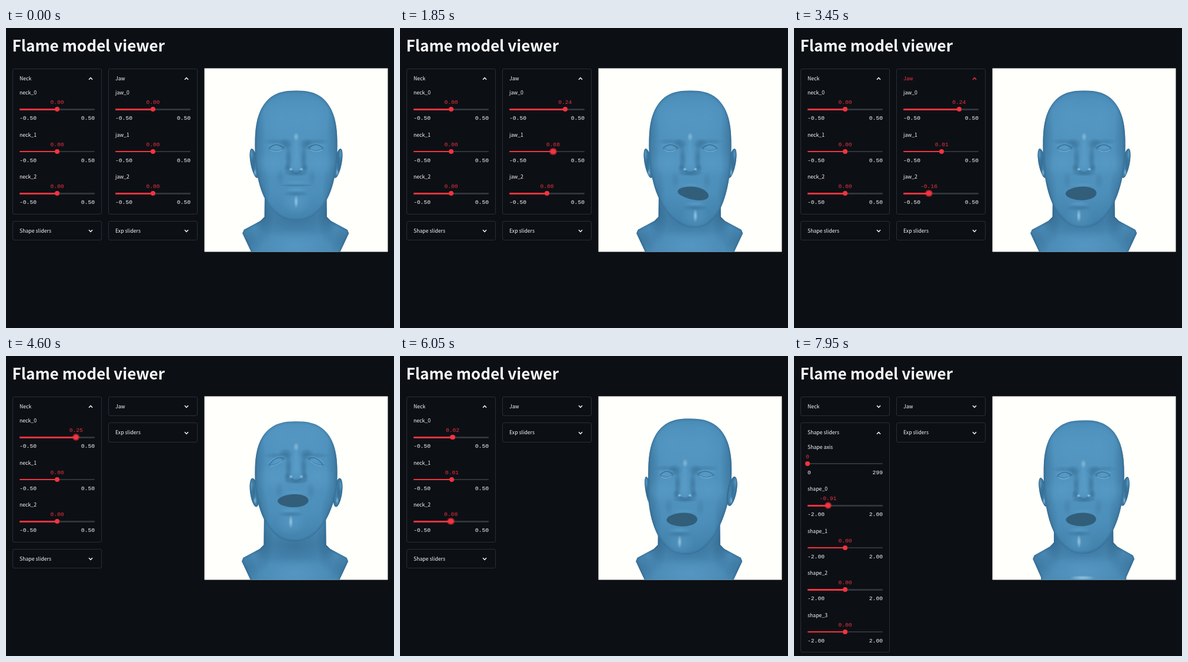
An HTML page with a canvas for the animation above (8000 ms loop, 660x510 px).

```html
<!DOCTYPE html>
<html lang="en">
<head>
<meta charset="utf-8">
<title>Flame model viewer</title>
<style>
  html, body { margin: 0; width: 100%; height: 100%; overflow: hidden; background: #0c1015; }
  body { position: relative; color: #fafafa; font: 8.7px/12px "Noto Sans CJK JP", "Noto Sans CJK SC", "Noto Sans", sans-serif; }
  h1 { position: absolute; left: 10.5px; top: 9px; margin: 0; font-size: 26.1px; line-height: 40px; font-weight: 700; white-space: nowrap; }
  canvas { position: absolute; left: 337px; top: 68px; width: 314px; height: 314px; }
  .col { position: absolute; top: 68.5px; width: 152px; }
  .panel { position: relative; box-sizing: border-box; border: 1px solid #2a2e36; border-radius: 3px; margin-bottom: 11px; }
  .head { height: 31.5px; line-height: 31px; padding-left: 11px; }
  .head svg { position: absolute; right: 14px; top: 12.5px; width: 8px; height: 8px; fill: none; stroke: currentColor; stroke-width: 1.5; }
  .open .head svg { transform: scaleY(-1); }
  .body { display: none; }
  .open .body { display: block; }
  .hot { color: #f5333f; }
  .slider { position: relative; height: 71.5px; margin: 0 11px; }
  .slider > * { position: absolute; }
  .name { top: 3.2px; left: 0; }
  .num { font: 9.67px/12px "Liberation Mono", monospace; white-space: nowrap; }
  .val { top: 20px; color: #ee3040; transform: translateX(-50%); }
  .min { top: 47.3px; left: 0; }
  .max { top: 47.3px; right: 0; }
  .rail, .fill { top: 36px; left: 0; height: 2.6px; border-radius: 1.3px; }
  .rail { width: 100%; background: #30343b; }
  .fill { background: #f5333f; }
  .knob { top: 33.1px; width: 8.4px; height: 8.4px; margin-left: -4.2px; border-radius: 50%; background: #f5333f; }
  .focus .knob { box-shadow: 0 0 0 2px rgba(245, 51, 63, .55); }
</style>
</head>
<body>
<h1>Flame model viewer</h1>
<div class="col" id="left" style="left:11px"></div>
<div class="col" id="right" style="left:174px"></div>
<canvas></canvas>
<script>
const LOOP = 8000, LAG = 150, CX = 493.5, CY = 240;

// Each drag swings in half waves around an eased move to its end value
const DRAGS = {
  jaw_0: { from: 550, to: 1250, end: .24, amp: .12, waves: 1 },
  jaw_1: { from: 1400, to: 2450, end: .01, amp: .18, waves: 2 },
  jaw_2: { from: 2600, to: 3250, end: -.16, amp: .2, waves: 1 },
  neck_0: { from: 3900, to: 4750, end: .02, amp: -.262, waves: 2 },
  neck_1: { from: 4950, to: 5950, end: .01, amp: -.38, waves: 2 },
  neck_2: { from: 6050, to: 6750, end: .01, amp: -.33, waves: 2 },
  shape_0: { from: 7550, to: 7950, end: -.91, amp: 0, waves: 0 }
};
const JAW_CLOSES = 3550, NECK_CLOSES = 7000, SHAPE_OPENS = 7150;

const clamp = (v, a, b) => Math.min(b, Math.max(a, v));
const mix = (a, b, p) => a + (b - a) * p;
const ease = p => { p = clamp(p, 0, 1); return p * p * (3 - 2 * p); };
const between = (t, a, b) => t >= a && t < b;

function valueAt(name, t) {
  const d = DRAGS[name];
  if (!d) return 0;
  const p = clamp((t - d.from) / (d.to - d.from), 0, 1);
  return d.end * ease(p) + d.amp * Math.sin(Math.PI * d.waves * p);
}

function focusAt(t) {
  const begun = Object.keys(DRAGS).filter(name => t >= DRAGS[name].from).pop();
  const closed = { jaw_2: JAW_CLOSES, neck_2: NECK_CLOSES }[begun];
  return closed && t >= closed ? '' : begun;
}

// ---- Controls ----
const sliders = [];

function add(parent, cls, text = '') {
  const el = document.createElement('div');
  el.className = cls;
  el.textContent = text;
  parent.append(el);
  return el;
}

function addSlider(body, name, min, max, digits = 2) {
  const root = add(body, 'slider');
  add(root, 'name', name);
  add(root, 'rail');
  const fill = add(root, 'fill'), knob = add(root, 'knob'), val = add(root, 'num val');
  add(root, 'num min', min.toFixed(digits));
  add(root, 'num max', max.toFixed(digits));
  sliders.push({ name, min, max, digits, root, fill, knob, val });
}

function addPanel(col, title, fill) {
  const root = add(document.getElementById(col), 'panel');
  const head = add(root, 'head', title);
  head.insertAdjacentHTML('beforeend', '<svg viewBox="0 0 8 8"><path d="M1 2.2 4 5.4 7 2.2"/></svg>');
  const body = add(root, 'body');
  if (fill) fill(body);
  return { root, head };
}

const series = (part, count, limit) => body => {
  for (let i = 0; i < count; i++) addSlider(body, part + '_' + i, -limit, limit);
};
const neck = addPanel('left', 'Neck', series('neck', 3, .5));
const shape = addPanel('left', 'Shape sliders', body => {
  addSlider(body, 'Shape axis', 0, 299, 0);
  series('shape', 4, 2)(body);
});
const jaw = addPanel('right', 'Jaw', series('jaw', 3, .5));
addPanel('right', 'Exp sliders');

function setPanel(panel, open, hot) {
  panel.root.classList.toggle('open', open);
  panel.head.classList.toggle('hot', hot);
}

function drawControls(t) {
  setPanel(neck, t < NECK_CLOSES, between(t, NECK_CLOSES - 100, NECK_CLOSES + 50));
  setPanel(jaw, t < JAW_CLOSES, between(t, JAW_CLOSES - 150, JAW_CLOSES + 100));
  setPanel(shape, t >= SHAPE_OPENS, between(t, SHAPE_OPENS - 50, SHAPE_OPENS + 200));
  const focus = focusAt(t);
  for (const s of sliders) {
    const v = valueAt(s.name, t);
    const pos = (v - s.min) / (s.max - s.min) * 100 + '%';
    s.fill.style.width = s.knob.style.left = s.val.style.left = pos;
    s.val.textContent = v.toFixed(s.digits).replace(/^-(0\.00)$/, '$1');
    s.root.classList.toggle('focus', s.name === focus);
  }
}

// ---- Head ----
const canvas = document.querySelector('canvas'), ctx = canvas.getContext('2d');
const dpr = window.devicePixelRatio || 1;
canvas.width = canvas.height = 314 * dpr;

const DARK = '38,85,120', LIGHT = '100,168,211', SHINE = '190,226,246';

// Depth of the face surface
const faceZ = (x, y) => 118 - x * x / 45 - Math.max(0, 190 - y) * .8;

// Points of a closed curve, from a function of the angle
function ring(count, at) {
  return Array.from({ length: count }, (_, i) => at(i / count * 2 * Math.PI));
}

function trace(pts) {
  ctx.beginPath();
  pts.forEach(p => ctx.lineTo(...p));
  ctx.closePath();
}

function softSpot(x, y, rx, ry, rgb, alpha, turn = 0) {
  const g = ctx.createRadialGradient(0, 0, 0, 0, 0, 1);
  g.addColorStop(0, `rgba(${rgb},${alpha})`);
  g.addColorStop(.45, `rgba(${rgb},${alpha * .62})`);
  g.addColorStop(1, `rgba(${rgb},0)`);
  ctx.save();
  ctx.translate(x, y);
  ctx.rotate(turn);
  ctx.scale(rx * 1.3, ry * 1.3);
  ctx.fillStyle = g;
  ctx.fillRect(-1, -1, 2, 2);
  ctx.restore();
}

function rim(alpha) {
  for (const w of [1.2, 4, 8]) {
    ctx.lineWidth = w;
    ctx.strokeStyle = `rgba(${DARK},${alpha / Math.sqrt(w)})`;
    ctx.stroke();
  }
}

function drawBody({ yaw, pitch, roll, slim }) {
  const dx = roll * 14 - Math.abs(yaw) * 12 - Math.abs(pitch) * 4 - .8;
  const p = (x, y) => [CX + x * (1 - .045 * slim) + dx, y - 4 * slim];
  const half = [[76, 390], [76, 380], [90.5, 349], [88, 343], [60, 328], [53, 321], [52.5, 262]];
  trace([...half.map(([x, y]) => p(x, y)), ...half.reverse().map(([x, y]) => p(-x, y))]);
  ctx.fillStyle = '#4a8bb6';
  ctx.fill();
  ctx.save();
  ctx.clip();
  softSpot(...p(0, 322), 64, 28, DARK, .4);
  for (const s of [-1, 1]) {
    softSpot(...p(54 * s, 310), 14, 45, DARK, .4);
    softSpot(...p(85 * s, 362), 24, 22, DARK, .35);
  }
  softSpot(...p(0, 370), 50, 22, LIGHT, .4);
  softSpot(...p(-2, 381), 17, 3, SHINE, .6 * slim);
  rim(.3);
  ctx.restore();
}

function poseAt(t) {
  const v = name => valueAt(name, t);
  return {
    open: v('jaw_0'), swing: v('jaw_1'), tilt: v('jaw_2'),
    pitch: v('neck_0') * 1.3, yaw: -v('neck_1') * .6, roll: v('neck_2'),
    slim: -v('shape_0') / .62
  };
}

// x counts from the middle of the face; w is how far a point follows the jaw
function projector({ open, swing, tilt, pitch, yaw, roll, slim }) {
  const [cy, sy, cp, sp, cr, sr] = [yaw, pitch, roll].flatMap(a => [Math.cos(a), Math.sin(a)]);
  return (x, y, z, w = 0) => {
    y += w * (100 * open + x * (.75 * swing - .5 * tilt));
    x += w * (50 * swing + 60 * tilt);
    x *= 1 - .022 * slim;
    y = (y - CY) * (1 - .018 * slim) + .5 * slim;
    const x1 = x * cy + z * sy, z1 = z * cy - x * sy, y1 = y * cp - z1 * sp;
    return [CX + x1 * cr + y1 * sr + roll * 10, CY - x1 * sr + y1 * cr];
  };
}

// Skull and jaw: two superelliptic halves that meet at eye level
function outline(project, yaw) {
  const arc = (v, n) => Math.sign(v) * Math.abs(v) ** (2 / n);
  return ring(96, a => {
    const low = Math.sin(a) > 0, n = low ? 2.25 : 2.6;
    const q = arc(Math.sin(a), n), x = 70 * arc(Math.cos(a), n), y = 200 + q * (low ? 127 : 93.5);
    const facing = 26 + 44 * ease((y - 190) / 90), away = -20 + 90 * ease((y - 190) / 150);
    const z = mix(away, facing, .5 + .5 * Math.tanh(x * yaw * .15));
    return project(x, y, z, low ? .5 * q * q : 0);
  });
}

function drawEar(side, project) {
  trace(ring(28, a => {
    const c = Math.cos(a), s = Math.sin(a);
    return project(side * (71 + 6.5 * c - 4.5 * s), 230 + 25 * s, -6 - 16 * c);
  }));
  ctx.fillStyle = '#4484ae';
  ctx.fill();
  ctx.save();
  ctx.clip();
  rim(.5);
  softSpot(...project(72 * side, 228, -8), 3, 15, DARK, .5);
  softSpot(...project(76 * side, 214, -18), 2, 8, LIGHT, .6);
  softSpot(...project(70 * side, 246, 0), 2, 5, SHINE, .5);
  ctx.restore();
}

function drawEye(side, project) {
  const lid = (from, to, y, bulge, rgb, alpha) => {
    const q = (x, yy) => project(x * side, yy, faceZ(x, yy));
    ctx.beginPath();
    ctx.moveTo(...q(from, y));
    ctx.quadraticCurveTo(...q((from + to) / 2, y + bulge), ...q(to, y));
    ctx.strokeStyle = `rgba(${rgb},${alpha})`;
    ctx.lineWidth = 1.2;
    ctx.stroke();
  };
  lid(20, 48, 200, -7, LIGHT, .5);
  lid(21, 46, 204.5, -12, DARK, .6);
  lid(21, 46, 204.5, 8, DARK, .35);
  lid(24, 44, 207, 6, SHINE, .35);
}

function drawMouth(project, open) {
  const gap = ease(open * 12);
  trace(ring(40, a => {
    const x = 26 * Math.cos(a), s = Math.sin(a);
    return project(x, 267.5 + s, 116, .58 + (s > 0 ? .42 : .45) * s);
  }));
  ctx.fillStyle = `rgba(50,94,122,${mix(.4, 1, gap)})`;
  ctx.fill();
}

function drawFace(project, { yaw, roll, open }) {
  const spot = (x, y, rx, ry, rgb, alpha, w = 0, lift = 0) =>
    softSpot(...project(x, y, faceZ(x, y) + lift, w), rx * Math.cos(yaw), ry, rgb, alpha, -roll);
  const pair = (x, ...rest) => [-1, 1].forEach(s => spot(x * s, ...rest));

  // Planes of the skull and cheeks
  pair(72, 190, 16, 75, DARK, .4);
  pair(62, 275, 14, 38, DARK, .35, .2);
  pair(26, 150, 32, 34, LIGHT, .25);
  pair(38, 230, 22, 18, LIGHT, .3);
  pair(27, 254, 6, 12, DARK, .16, .2);

  // Brow and eyes
  pair(18, 197, 10, 8, DARK, .42);
  pair(35, 193, 17, 4, DARK, .22);
  pair(34, 203, 11, 5, LIGHT, .35);
  spot(0, 185, 4, 6, SHINE, .45);
  [-1, 1].forEach(s => drawEye(s, project));

  // Nose
  pair(13, 221, 5, 20, DARK, .36);
  pair(15, 238, 5, 7, DARK, .36);
  for (let i = 0; i < 5; i++) spot(0, 196 + i * 9.5, 4 + i, 8, LIGHT, .3, 0, i * 4);
  spot(0, 247, 17, 4, DARK, .5);
  pair(9, 240, 2.6, 2, SHINE, .65, 0, 6);
  pair(7, 243.5, 3.5, 1.5, DARK, .45);

  // Lips and chin
  spot(0, 262, 18, 3, LIGHT, .3, .2);
  spot(0, 275, 15, 4, LIGHT, .45, 1);
  spot(0, 282, 17, 4, DARK, .35, 1);
  spot(0, 298, 20, 16, LIGHT, .35, 1);
  spot(0, 295, 3, 9, SHINE, .6, 1);
  drawMouth(project, open);
}

function drawHead(t) {
  const pose = poseAt(t), project = projector(pose);
  const near = side => side * pose.yaw < -.03;
  const ears = test => [-1, 1].filter(test).forEach(s => drawEar(s, project));

  drawBody(pose);
  ears(s => !near(s));
  trace(outline(project, pose.yaw));
  const [gx, gy] = project(0, 205, 60);
  const base = ctx.createRadialGradient(gx, gy, 20, gx, gy, 125);
  base.addColorStop(0, '#5194bf');
  base.addColorStop(.6, '#4c8fba');
  base.addColorStop(1, '#4282ac');
  ctx.fillStyle = base;
  ctx.fill();
  ctx.save();
  ctx.clip();
  rim(.3);
  drawFace(project, pose);
  ctx.restore();
  ears(near);
}

function frame(now) {
  const t = now % LOOP;
  drawControls(t);
  ctx.setTransform(dpr, 0, 0, dpr, -337 * dpr, -68 * dpr);
  ctx.clearRect(337, 68, 314, 314);
  ctx.save();
  ctx.fillStyle = '#fffffb';
  ctx.fillRect(337.5, 68.5, 312, 312);
  ctx.beginPath();
  ctx.rect(338, 69, 311, 311.5);
  ctx.clip();
  drawHead(t - LAG);
  ctx.restore();
  requestAnimationFrame(frame);
}
requestAnimationFrame(frame);
</script>
</body>
</html>
```
